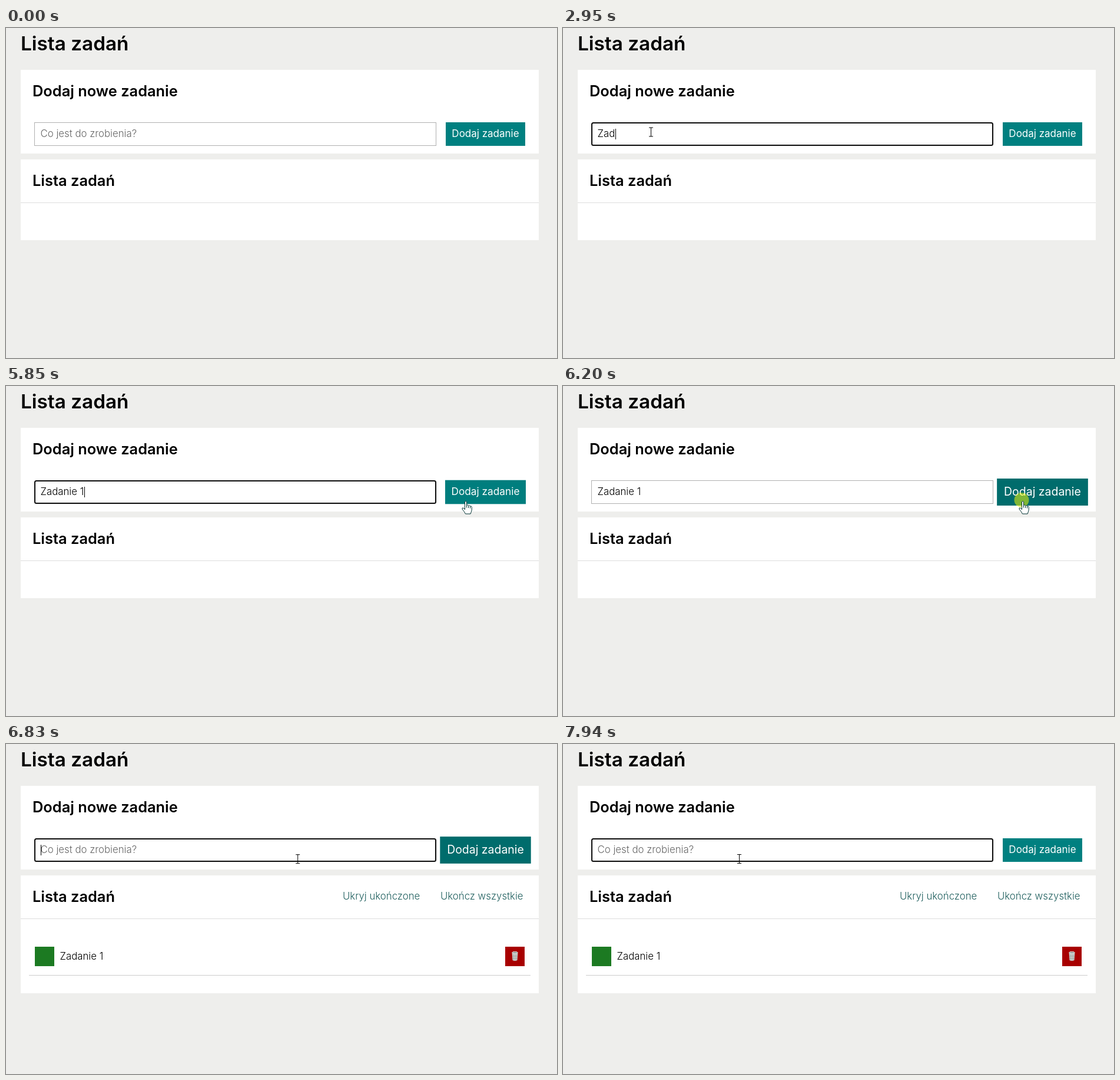
Recreate the animation shown at these times as an HTML page. Size 936 by 560 pixels, loop 8000 ms.

```html
<!DOCTYPE html>
<html lang="pl">
<head>
<meta charset="utf-8">
<title>Lista zadań</title>
<style>
  html, body { margin: 0; width: 100%; height: 100%; overflow: hidden; background: #eeeeec; }
  svg { display: block; width: 936px; height: 560px; }
  text { font: 300 16.8px Inter, "Open Sans", sans-serif; white-space: pre; }
  .h1 { font-size: 33.3px; font-weight: 600; }
  .h2 { font-size: 25.4px; font-weight: 600; }
  .link { fill: #1f5f5e; }
  .button { font-size: 17px; font-weight: 400; fill: #fff; text-anchor: middle; }
</style>
</head>
<body>
<svg viewBox="0 0 936 560">
  <rect width="936" height="560" fill="#eeeeec"/>
  <text class="h1" x="25" y="38">Lista zadań</text>

  <rect x="25" y="71" width="880" height="142" fill="#fff"/>
  <text class="h2" x="45" y="116">Dodaj nowe zadanie</text>
  <rect id="field" fill="#fff"/>
  <text id="entry" x="58.5" y="185"></text>
  <rect id="caret" y="171" width="1" height="18"/>
  <g id="button">
    <rect id="buttonFace" x="-67.5" y="-20" width="135" height="40"/>
    <text class="button" y="5">Dodaj zadanie</text>
  </g>

  <rect id="list" x="25" y="223" width="880" fill="#fff"/>
  <text class="h2" x="45" y="268">Lista zadań</text>
  <rect x="25" y="296" width="880" height="1" fill="#ddd"/>

  <g id="task">
    <text class="link" x="572" y="264">Ukryj ukończone</text>
    <text class="link" x="738" y="264">Ukończ wszystkie</text>
    <rect x="49" y="344" width="33" height="33" fill="#1c7a22"/>
    <text x="91.5" y="366">Zadanie 1</text>
    <rect x="848" y="344" width="33" height="33" fill="#a80000"/>
    <path d="M859.5 354L860.5 367Q864.5 369 868.5 367L869.5 354Z" fill="#c6cac8"/>
    <path d="M862.5 357V366M866.5 357V366M860 360H869M860.5 364H868.5" stroke="#989e9c" stroke-width=".7"/>
    <ellipse cx="864.5" cy="354" rx="4.8" ry="1.6" fill="#949a98" stroke="#e3e7e5"/>
    <rect x="39" y="392" width="852" height="1" fill="#ccc"/>
  </g>

  <circle id="press" r="12.5" fill="#ff0" fill-opacity=".5"/>
  <g id="cursor">
    <path id="arrow" d="M.5 .5V16.5L4.2 13L6.6 18.6L9.4 17.4L7 12H12Z" fill="#fff" stroke="#000"/>
    <path id="beam" d="M-3.5 -7.5H3.5M0 -7.5V7.5M-3.5 7.5H3.5" fill="none" stroke="#000"/>
    <path id="hand" d="M-1.5 1Q0 -1 1.5 1V7Q3.5 5.5 4.5 7.5Q6.5 6.5 7.5 8.5Q9.8 7.5 10.2 10V15Q9.5 18 8 21.5H-.5Q-2 18 -6 13.5Q-6.5 10.5 -4 11.5L-1.5 14ZM1.5 7V11M4.5 8V11.5M7.5 9V12" fill="#fff" stroke="#033" stroke-linejoin="round"/>
  </g>
</svg>
<script>
  const LOOP = 8000;
  const BLINK = 530;
  const ENTER = 990, FOCUS = 1530, LEAVE_FIELD = 5020, BLUR = 6200, SUBMIT = 6340, RETURN = 6550;
  const PRESS_TIME = 340;
  const HOVER_IN = 5765, HOVER_OUT = 6640, HOVER_TIME = 1000;
  const TASK = "Zadanie 1";
  const TYPE_START = 2480, KEY_TIME = 230, LAST_KEY = 4490;

  const OUTSIDE = { x: 329, y: 539 };
  const IN_FIELD = { x: 149.5, y: 176.5 };
  const ON_BUTTON = { x: 781, y: 195.5 };
  const FIELD_EDGE = { x: 299.5, y: 195 };

  const $ = id => document.getElementById(id);
  const set = (id, attrs) => {
    for (const name in attrs) $(id).setAttribute(name, attrs[name]);
  };
  const show = (id, visible) => set(id, { visibility: visible ? "visible" : "hidden" });
  const clamp = v => Math.min(1, Math.max(0, v));
  const progress = (t, start, duration) => clamp((t - start) / duration);
  const easeOut = p => 1 - (1 - p) ** 2;
  const smooth = p => p * p * (3 - 2 * p);
  const inside = (p, left, top, right, bottom) =>
    p.x >= left && p.x <= right && p.y >= top && p.y <= bottom;

  // cubic-bezier(.25, .1, .25, 1)
  function ease(p) {
    const curve = (s, a, b) => 3 * s * (1 - s) ** 2 * a + 3 * s * s * (1 - s) * b + s ** 3;
    let low = 0, high = 1;
    for (let i = 0; i < 20; i++) {
      const mid = (low + high) / 2;
      if (curve(mid, .25, .25) < p) low = mid; else high = mid;
    }
    return curve(low, .1, 1);
  }

  // Straight move that sags by the given depth halfway.
  const glide = (from, to, p, sag = 0) => ({
    x: from.x + (to.x - from.x) * p,
    y: from.y + (to.y - from.y) * p + sag * 4 * p * (1 - p)
  });

  function pointerAt(t) {
    if (t < LEAVE_FIELD) return glide(OUTSIDE, IN_FIELD, easeOut(progress(t, ENTER, 280)));
    if (t < RETURN) return glide(IN_FIELD, ON_BUTTON, smooth(progress(t, LEAVE_FIELD, 800)), 85);
    return glide(ON_BUTTON, FIELD_EDGE, smooth(progress(t, RETURN, 500)));
  }

  function hoverAt(t) {
    const rise = ease(progress(Math.min(t, HOVER_OUT), HOVER_IN, HOVER_TIME));
    return rise * (1 - ease(progress(t, HOVER_OUT, HOVER_TIME)));
  }

  function typedCount(t) {
    if (t < TYPE_START || t >= SUBMIT) return 0;
    if (t >= LAST_KEY) return TASK.length;
    return Math.min(TASK.length - 1, 1 + Math.floor((t - TYPE_START) / KEY_TIME));
  }

  function caretStart(t, count) {
    if (t >= SUBMIT) return SUBMIT + 10;
    if (count === 0) return FOCUS + 20;
    return count === TASK.length ? LAST_KEY : TYPE_START + (count - 1) * KEY_TIME;
  }

  function drawField(t) {
    const focused = t >= FOCUS && (t < BLUR || t >= SUBMIT);
    set("field", focused
      ? { x: 49, y: 161, width: 681, height: 38, rx: 2.5, stroke: "#0c0c0c", "stroke-width": 2 }
      : { x: 48.5, y: 160.5, width: 682, height: 39, rx: 0, stroke: "#b0b0b0", "stroke-width": 1 });

    const count = typedCount(t);
    const entry = $("entry");
    entry.textContent = count ? TASK.slice(0, count) : "Co jest do zrobienia?";
    set("entry", { fill: count ? "#000" : "#666" });

    const blinkOn = Math.floor(Math.max(0, t - caretStart(t, count)) / BLINK) % 2 === 0;
    set("caret", { x: Math.round(59 + (count && entry.getComputedTextLength())) });
    show("caret", focused && blinkOn);
  }

  function drawButton(t) {
    const hover = hoverAt(t);
    const tone = Math.round(128 - 28 * hover);
    set("button", { transform: `translate(814.5 180) scale(${1 + .2 * hover})` });
    set("buttonFace", { fill: `rgb(0,${tone},${tone})` });
  }

  function drawPointer(t) {
    const point = pointerAt(t);
    const visible = t >= ENTER;
    const overField = inside(point, 48, 160, 731, 200);
    const overButton = inside(point, 747, 160, 882, 200);
    set("cursor", { transform: `translate(${point.x} ${point.y})` });
    show("beam", visible && overField);
    show("hand", visible && overButton);
    show("arrow", visible && !overField && !overButton);
    set("press", { cx: point.x - 2, cy: point.y - 2 });
    show("press", (t >= FOCUS && t < FOCUS + PRESS_TIME) || (t >= BLUR && t < SUBMIT));
  }

  function draw(t) {
    drawField(t);
    drawButton(t);
    drawPointer(t);
    set("list", { height: t >= SUBMIT ? 200 : 137 });
    show("task", t >= SUBMIT);
  }

  const start = performance.now();
  function tick() {
    draw((performance.now() - start) % LOOP);
    requestAnimationFrame(tick);
  }
  tick();
</script>
</body>
</html>
```
